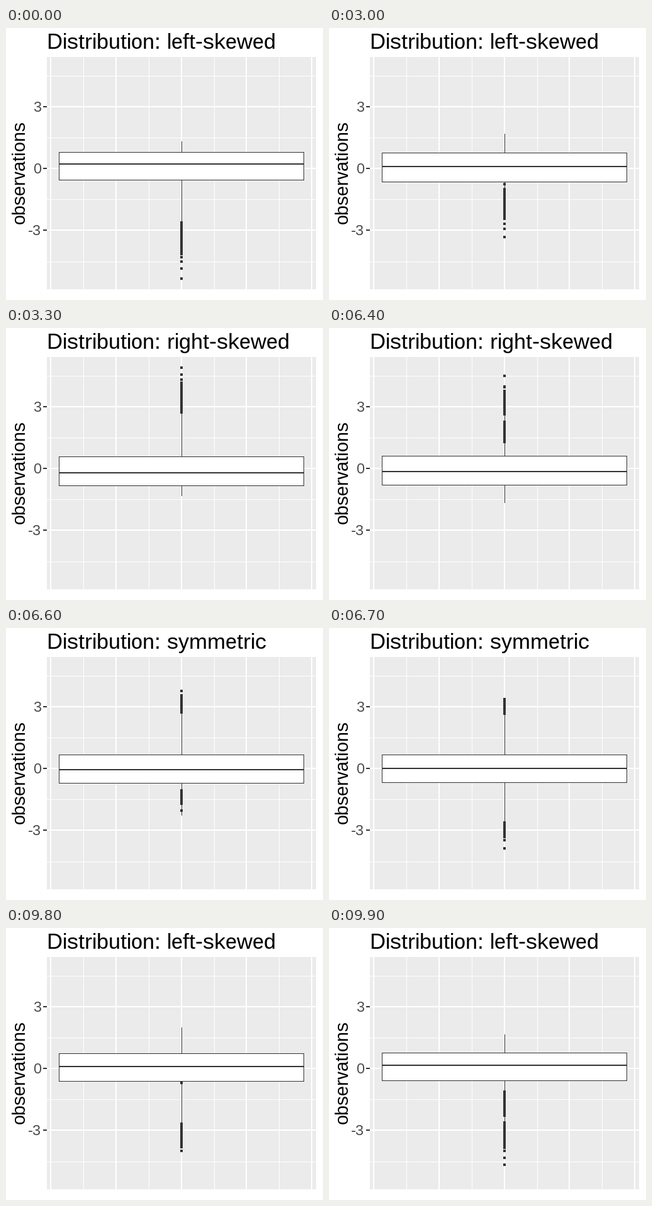
A matplotlib script that plays this animation: 504 px wide and 432 px high, repeating every 10000 ms.

```python
import numpy as np
import matplotlib.pyplot as plt
from matplotlib.animation import FuncAnimation
from matplotlib.collections import PolyCollection
from matplotlib.patches import Rectangle

W, H, DPI = 504, 432, 100
INK = "#333333"
# Whole-pixel glyph advances with vertical hinting only
plt.rcParams.update({"font.family": "Liberation Sans",
                     "text.hinting": "native", "text.hinting_factor": 1})

fig = plt.figure(figsize=(W / DPI, H / DPI), dpi=DPI, facecolor="white")
ax = fig.add_axes([0, 0, 1, 1])
ax.set_xlim(0, W)
ax.set_ylim(H, 0)
ax.axis("off")


def rect(x0, y0, x1, y1, color, z):
    patch = Rectangle((x0, y0), x1 - x0, y1 - y0, fc=color, lw=0,
                      antialiased=False, zorder=z)
    return ax.add_patch(patch)


def grid_span(pos, major):
    return (pos - 1, pos + 1) if major else (pos, pos + 1)


# Panel, grid and axis
LEFT, TOP, RIGHT, BOTTOM = 65, 46, 493, 415
rect(LEFT, TOP, RIGHT, BOTTOM, "#EBEBEB", 0)
for k in range(9):
    major = k % 2 == 0
    x0, x1 = grid_span(round(71.2 + 51.875 * k), major)
    rect(x0, TOP, x1, BOTTOM, "white", 1 + major / 2)
for k in range(-3, 4):
    major = k % 2 == 0
    y = round(223.1 + 49.15 * k)
    y0, y1 = grid_span(y, major)
    rect(LEFT, y0, RIGHT, y1, "white", 1 + major / 2)
    if major:
        rect(LEFT - 6, y0, LEFT, y1, INK, 1)
        ax.text(55.8, y + 8, str(-3 * k // 2), size=16.8, color="#4D4D4D",
                ha="right", va="baseline")
ax.text(30, 229, "observations", size=21, rotation=90,
        rotation_mode="anchor", ha="center", va="baseline")
title = ax.text(LEFT, 33, "", size=25.2, ha="left", va="baseline")

# Upper whisker, box top, median, box bottom, lower whisker (pixels)
NAMES = ("left-skewed", "right-skewed", "symmetric")
BOXES = np.array([
    [180, 197.0, 216, 241.9, 309],
    [134, 204.3, 230, 250.5, 267],
    [136, 201.2, 223, 245.4, 309],
])

N = 160


def tail(start, body, far, n=N):
    """Outliers from the whisker out: a dense run, then a few far ones."""
    u = np.linspace(0, 1, n)
    return start + body * u + far * u ** 70


OUTLIERS = (
    tail(309, 44, 45),
    tail(134, -40, -31)[::-1],
    np.concatenate([tail(136, -23, 0, N // 2)[::-1],
                    tail(309, 20, 21, N // 2)[::-1]]),
)

rng = np.random.default_rng(7)


def pair(a, b):
    """Match outliers at random, keeping the two end points together."""
    b = b.copy()
    rng.shuffle(b[1:-1])
    return np.column_stack([a, b])


PATHS = [pair(OUTLIERS[i], OUTLIERS[(i + 1) % 3]) for i in range(3)]

angle = np.linspace(0, 2 * np.pi, 16, endpoint=False)
DOT = 1.9 * np.column_stack([np.cos(angle), np.sin(angle)])
dots = ax.add_collection(PolyCollection([DOT], facecolors=INK, linewidths=0,
                                        antialiaseds=False, zorder=2),
                         autolim=False)
whisker = rect(279, 180, 280, 309, INK, 3)
frame_box = rect(84, 197, 474, 242, INK, 4)
fill_box = rect(85, 198, 473, 241, "white", 5)
median = rect(84, 215, 474, 217, INK, 6)

STARTS = (30, 64, 97)
STEPS = 4


def locate(n):
    """State index and progress towards the next state."""
    for i, start in enumerate(STARTS):
        if n < start + STEPS - 1:
            return i, max(0, n - start + 1) / STEPS
    return 0, 0.0


def span(patch, y0, y1):
    patch.set_y(y0)
    patch.set_height(y1 - y0)


def draw(n):
    i, t = locate(n)
    j = (i + 1) % 3
    title.set_text("Distribution: " + NAMES[j if t >= 0.5 else i])

    high, top, mid, bottom, low = BOXES[i] + t * (BOXES[j] - BOXES[i])
    top, bottom = np.floor(top), np.floor(bottom)
    span(whisker, round(high), round(low))
    span(frame_box, top, bottom + 1)
    span(fill_box, top + 1, bottom)
    span(median, round(mid) - 1, round(mid) + 1)

    ys = np.unique(np.round(PATHS[i] @ [1 - t, t]))
    dots.set_verts([DOT + (279, y) for y in ys])
    return title, whisker, frame_box, fill_box, median, dots


anim = FuncAnimation(fig, draw, frames=100, interval=100, repeat=True,
                     repeat_delay=0, blit=False)
plt.show()
```
